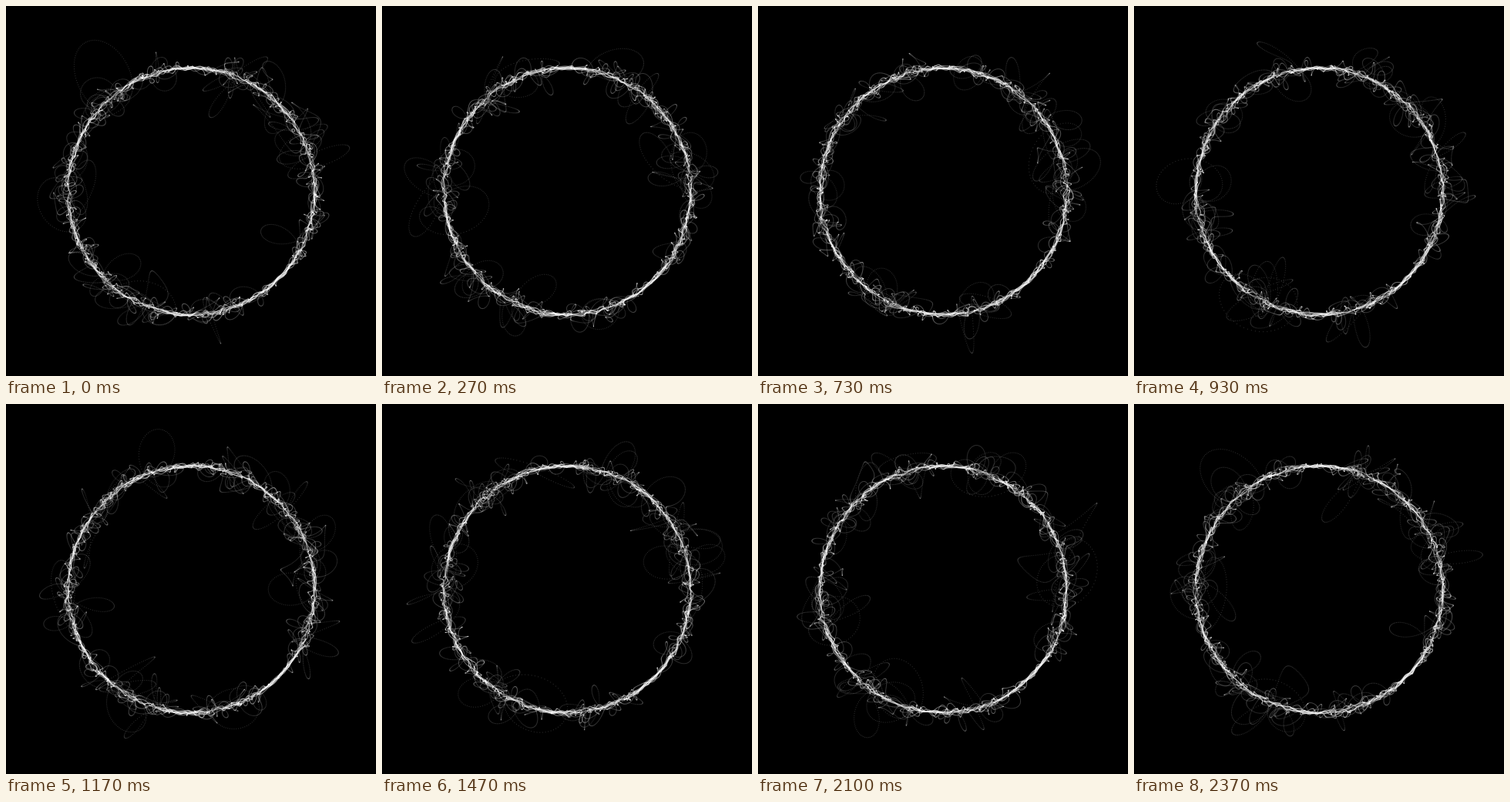
Recreate the animation shown at these times as an HTML page with a canvas. Size 480 by 480 pixels, loop 2.41 s.

```html
<!DOCTYPE html>
<html>
<head>
<meta charset="utf-8">
<style>
html, body { margin: 0; width: 100%; height: 100%; overflow: hidden; background: #000; }
canvas { display: block; width: 480px; height: 480px; }
</style>
</head>
<body>
<canvas id="stage" width="480" height="480"></canvas>
<script>
const SIZE = 480, LOOP = 2410, STEPS = 72;
const RADIUS = 160, STRANDS = 11, N = 4096, MASK = N - 1, QUARTER = N / 4;
const DOT = 0.13, REACH = 25, DRIFT = 0.8;
const TAU = Math.PI * 2;

// Unrest along the ring: angle in degrees, half width, strength
const KNOTS = [
  [0, 10, 0.5], [24, 10, 0.45], [64, 9, 0.25], [79, 9, 0.5],
  [110, 8, 0.5], [122, 10, 0.7], [139, 9, 0.42], [153, 7, 0.25],
  [169, 8, 0.6], [184, 9, 0.8], [209, 8, 0.35], [225, 9, 0.75],
  [236, 5, 0.4], [253, 8, 0.6], [290, 10, 0.65], [310, 10, 0.5],
  [325, 7, 0.4], [341, 11, 0.7]
];

let seed = 20417;
function random() {
  seed = (seed + 0x6D2B79F5) | 0;
  let r = Math.imul(seed ^ (seed >>> 15), 1 | seed);
  r = (r + Math.imul(r ^ (r >>> 7), 61 | r)) ^ r;
  return ((r ^ (r >>> 14)) >>> 0) / 4294967296;
}
const between = (lo, hi) => lo + Math.floor(random() * (hi - lo + 1));
const sign = () => random() < 0.5 ? -1 : 1;

const sine = Float32Array.from({ length: N }, (_, i) => Math.sin(i / N * TAU));

const unrest = Float32Array.from({ length: N }, (_, i) => {
  const deg = i / N * 360;
  return KNOTS.reduce((sum, [at, width, strength]) => {
    const d = ((deg - at + 540) % 360 - 180) / width;
    return sum + strength * Math.exp(-d * d);
  }, 0.05);
});

// Whole-number waves keep the strands closed and the loop seamless
const waves = (count, lo, hi, speed) =>
  Array.from({ length: count }, () => ({
    k: between(lo, hi),
    m: between(1, speed) * sign(),
    phase: between(0, MASK),
    turn: QUARTER * sign()
  }));

const strands = Array.from({ length: STRANDS }, () => ({
  curl: waves(5, 8, 62, 4),
  gate: waves(2, 5, 23, 2)
}));

function sum(list, i, turned) {
  let v = 0;
  for (let j = 0; j < list.length; j++) {
    const w = list[j];
    v += sine[(w.k * i + w.now + turned * w.turn) & MASK];
  }
  return v;
}

const ctx = document.getElementById('stage').getContext('2d');
const image = ctx.createImageData(SIZE, SIZE);
const light = new Float32Array(SIZE * SIZE);

function splat(x, y) {
  const ix = Math.floor(x), iy = Math.floor(y);
  if (ix < 0 || iy < 0 || ix > SIZE - 2 || iy > SIZE - 2) return;
  const fx = x - ix, fy = y - iy, p = iy * SIZE + ix;
  light[p] += DOT * (1 - fx) * (1 - fy);
  light[p + 1] += DOT * fx * (1 - fy);
  light[p + SIZE] += DOT * (1 - fx) * fy;
  light[p + SIZE + 1] += DOT * fx * fy;
}

function draw(t) {
  light.fill(0);
  for (const { curl, gate } of strands) {
    for (const w of [...curl, ...gate]) w.now = w.phase + Math.round(w.m * t * N);
    for (let i = 0; i < N; i++) {
      const g = (1 + sum(gate, i, 0) / 2) / 2;
      const reach = 0.3 + REACH * unrest[i] * g * g * g;
      const r = RADIUS + DRIFT * sum(gate, i, 1);
      splat(
        SIZE / 2 + r * sine[(i + QUARTER) & MASK] + reach * sum(curl, i, 0),
        SIZE / 2 + r * sine[i] + reach * sum(curl, i, 1)
      );
    }
  }
  const px = image.data;
  for (let p = 0, q = 0; p < light.length; p++, q += 4) {
    px[q] = px[q + 1] = px[q + 2] = 255 * (1 - Math.exp(-1.4 * light[p]));
    px[q + 3] = 255;
  }
  ctx.putImageData(image, 0, 0);
}

let shown = -1;
function tick() {
  const step = Math.floor(performance.now() % LOOP / LOOP * STEPS);
  if (step !== shown) draw((shown = step) / STEPS);
  requestAnimationFrame(tick);
}
tick();
</script>
</body>
</html>
```
